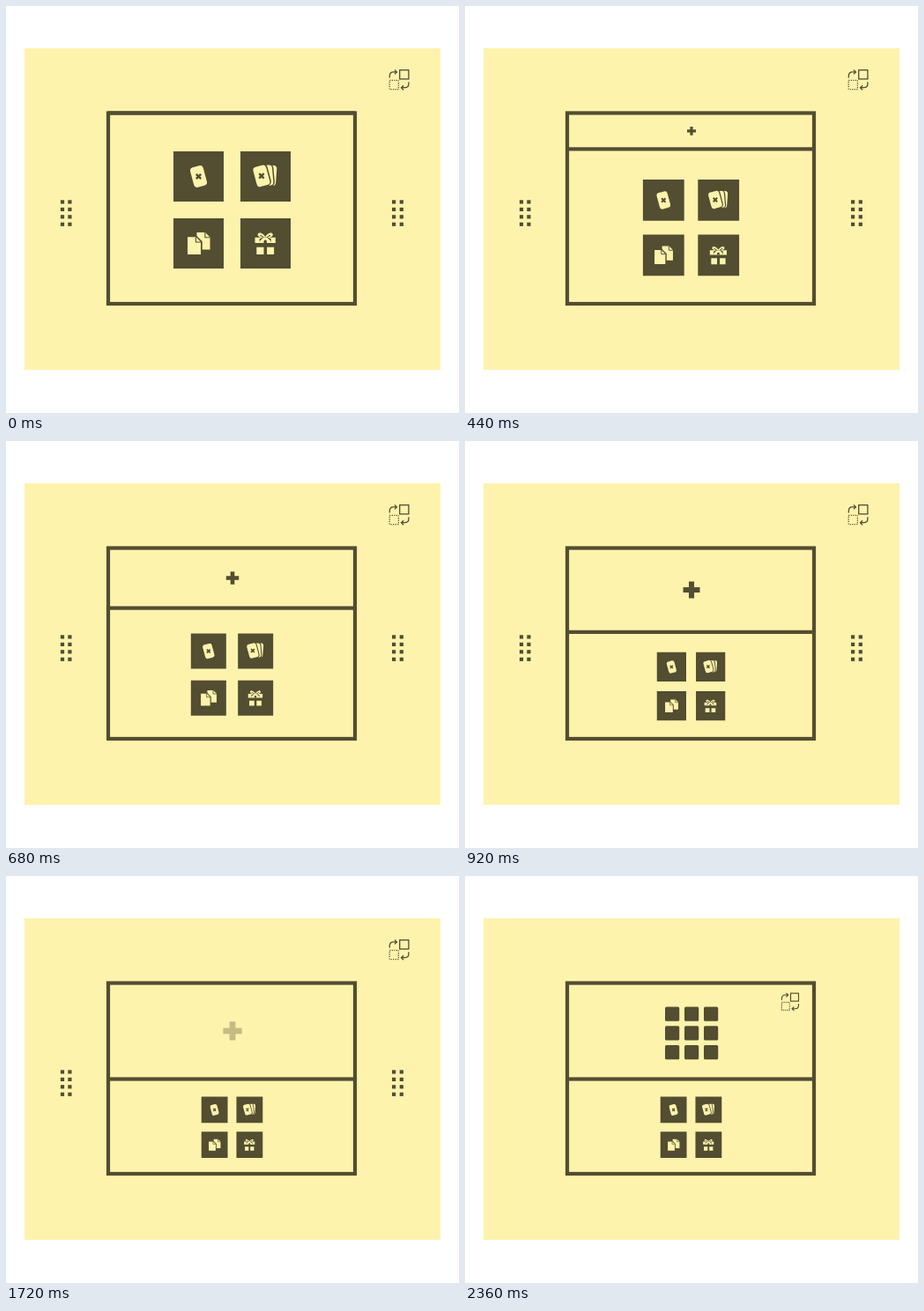
An HTML page for the animation above (2.56 s loop, 514x462 px).

```html
<!DOCTYPE html>
<html lang="en">
<head>
<meta charset="utf-8">
<title>Panel split</title>
<style>
  html, body { margin: 0; width: 100%; height: 100%; overflow: hidden; background: #fff; }
  svg { display: block; width: 514px; height: 462px; }
  .dark { fill: #534d31; }
  .light { fill: #fdf3ad; }
  .line { fill: none; stroke: #534d31; }
  .gap { stroke: #534d31; stroke-width: 3; paint-order: stroke; }
</style>
</head>
<body>
<svg viewBox="0 0 514 462">
  <defs>
    <rect id="card" x="-7.6" y="-11.6" width="15.2" height="23.2" rx="3.8"/>
    <path id="cross" class="line" stroke-width="2.4" d="M-2.7-2.7 2.7 2.7M2.7-2.7-2.7 2.7"/>
    <g id="page">
      <path class="light" d="M0 0H9.6L15 5.4V19.6H0Z"/>
      <path class="line" stroke-width="1.1" d="M9.4 0V5.7H15"/>
    </g>
    <g id="swap" class="line" stroke-width="1.3">
      <rect x="12.4" y=".7" width="10.2" height="10.2"/>
      <rect x=".9" y="12.4" width="10.2" height="10.2" stroke-dasharray="1.2 1.35"/>
      <path d="M1 9.4V7.4Q1 2.9 5.5 2.9H8.6M6.6.4 9.2 2.9 6.6 5.4"/>
      <path d="M22.6 14.2V16.2Q22.6 20.7 18.1 20.7H14.6M16.8 18.2 14.2 20.7 16.8 23.2"/>
    </g>
  </defs>

  <rect class="light" x="21" y="48" width="472" height="365"/>
  <g id="outer">
    <use href="#swap" x="434.3" y="72"/>
    <g id="dots" class="dark"></g>
  </g>

  <rect class="line" x="116" y="121.5" width="280" height="216.5" stroke-width="4.2"/>
  <rect id="bar" class="dark" x="116" y="-2.1" width="280" height="4.2"/>
  <path id="plus" class="dark" d="M-.16-.5H.16V-.16H.5V.16H.16V.5H-.16V.16H-.5V-.16H-.16Z"/>

  <!-- tiles are drawn around the centre of their 2 x 2 block -->
  <g id="tiles">
    <path class="dark" d="M-66.5-66.5h57v57h-57zM9.5-66.5h57v57h-57zM-66.5 9.5h57v57h-57zM9.5 9.5h57v57h-57z"/>

    <g transform="translate(-38 -38) rotate(-15)">
      <use href="#card" class="light"/>
    </g>
    <use href="#cross" transform="translate(-38 -38)"/>

    <g class="light gap">
      <use href="#card" transform="translate(42.6 -39.3) rotate(4)"/>
      <use href="#card" transform="translate(38.6 -39) rotate(-5)"/>
      <use href="#card" transform="translate(33.4 -38.6) rotate(-15)"/>
    </g>
    <use href="#cross" transform="translate(33.4 -38.6)"/>

    <use href="#page" x="-40" y="25.5"/>
    <path class="dark" d="M-52 29.3H-40.3L-33.8 35.8V46H-52Z"/>
    <use href="#page" x="-50.5" y="30.8"/>

    <g class="light">
      <path d="M26 31.2H49.3V37.4H26ZM27.8 42.2H36V50.5H27.8ZM39.6 42.2H47.6V50.5H39.6Z"/>
      <path d="M37.7 32.2Q30.5 31.5 29 28.4Q29.4 25.2 32.4 26.1Q36 27.4 37.7 30.2Q39.4 27.4 43 26.1Q46 25.2 46.4 28.4Q44.9 31.5 37.7 32.2Z"/>
    </g>
    <path class="dark" d="M36 37.5V33.8L31.2 36.3V32.8L35.2 31.1 31.6 29.2 32.4 28.2 36.2 30.8H39.2L43 28.2 43.8 29.2 40.2 31.1 44.2 32.8V36.3L39.4 33.8V37.5Z"/>
    <path class="light" d="M35.8 31H39.6L44 35.4 42.2 37.2 37.7 33.8 33.2 37.2 31.4 35.4Z"/>
  </g>

  <g id="inner">
    <use href="#swap" transform="translate(358.6 132.5) scale(.88)"/>
    <g id="cells" class="dark"></g>
  </g>
</svg>
<script>
const LOOP = 2560, STEP = 40;
const $ = id => document.getElementById(id);
const ramp = (t, a, b) => Math.min(1, Math.max(0, (t - a) / (b - a)));

function addBoxes(parent, xs, ys, size, r) {
  for (const y of ys) for (const x of xs) {
    const box = document.createElementNS("http://www.w3.org/2000/svg", "rect");
    const attrs = { x, y, width: size, height: size, rx: r };
    for (const k in attrs) box.setAttribute(k, attrs[k]);
    parent.append(box);
  }
}

addBoxes($("dots"), [61.9, 70.3, 438, 446.7], [220.3, 228.8, 237.2, 245.7], 4.2, 0);
addBoxes($("cells"), [227, 249, 271], [148.5, 170.3, 192.1], 16.2, 1.5);

function place(id, x, y, scale = 1) {
  $(id).setAttribute("transform", `translate(${x} ${y}) scale(${scale})`);
}

function fade(id, value) {
  $(id).setAttribute("opacity", value);
}

function draw(time) {
  const t = Math.floor((time % LOOP) / STEP) * STEP;
  const u = ramp(t, 80, 1040);
  place("bar", 0, 121.5 + 109 * u);
  place("plus", 257, 121.5 + 54.3 * u, 3.2 + 18 * u);
  place("tiles", 256.5, 231.5 + 53.8 * u, 1 - 0.477 * u);
  fade("plus", 1 - ramp(t, 1480, 1840));
  fade("inner", ramp(t, 1880, 2360));
  fade("outer", 1 - ramp(t, 2040, 2360));
}

const start = performance.now();
function tick() {
  draw(performance.now() - start);
  requestAnimationFrame(tick);
}
tick();
</script>
</body>
</html>
```
